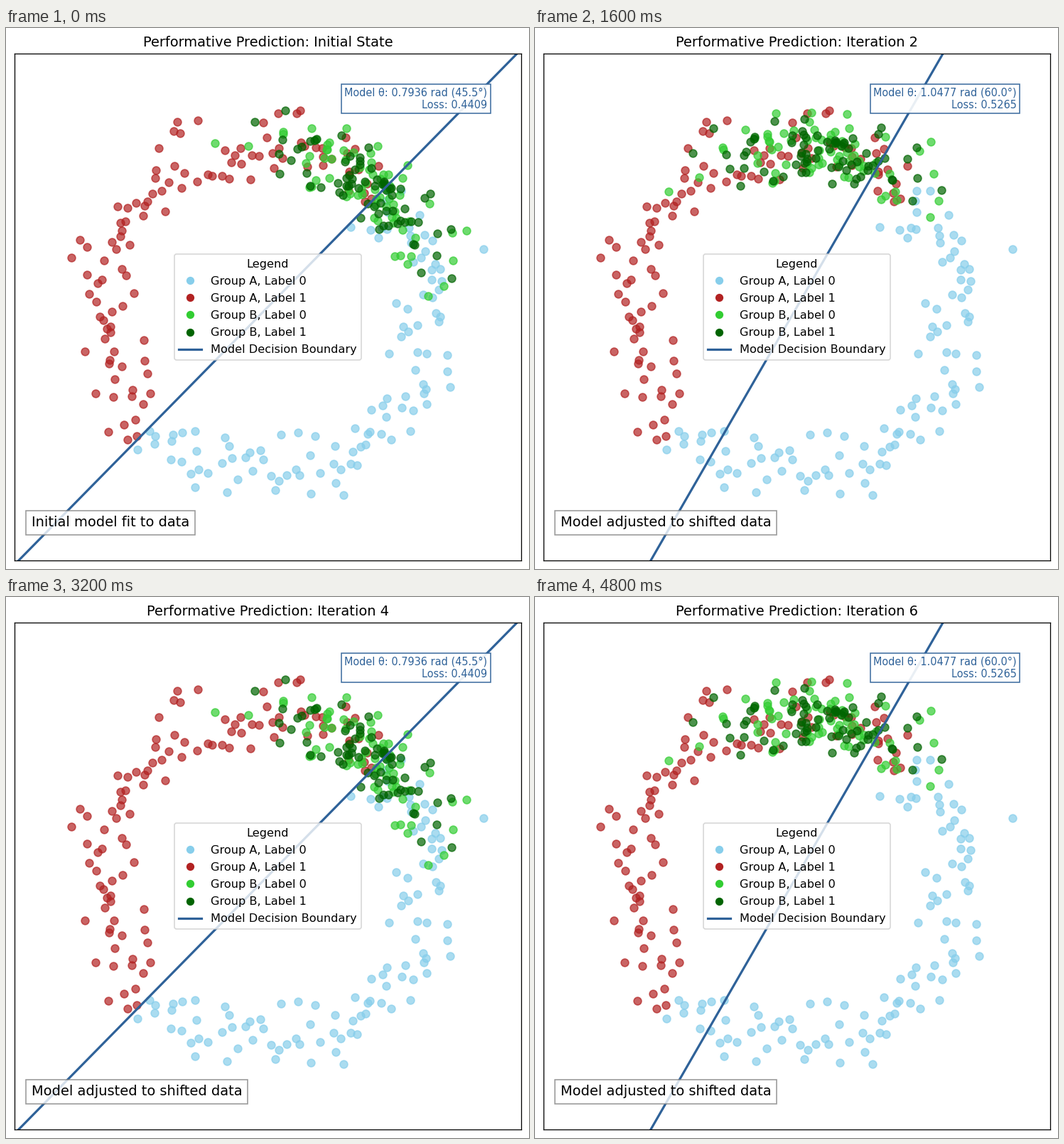
These frames come from a looping animation (736x761 px, 5.6 s). A matplotlib script:

```python
import numpy as np
import matplotlib.pyplot as plt
from matplotlib.animation import FuncAnimation
from matplotlib.lines import Line2D

plt.rcParams["font.family"] = "DejaVu Sans"

W, H, DPI = 736, 761, 116
LEFT, TOP, SIDE = 12, 36, 713
LIMIT = 1.5
BLUE = "#2f6299"

# One entry per step of the repeating cycle
THETAS = [0.7936, 0.3655, 1.0477, 0.7987]
LOSSES = [0.4409, 0.6881, 0.5265, 0.8521]
TURNS = [0, -60, 30, -90]

# Outliers as (degrees, radius)
FAR_A = [(15, 1.32), (44, 0.68), (292, 1.2), (87, 1.15), (116, 1.22),
         (166, 1.2), (218, 1.2)]
FAR_B = [(108, 1.02), (94, 1.1), (97, 0.96), (86, 0.91), (21, 1.26),
         (9, 1.1), (71, 0.75), (46, 0.85)]

rng = np.random.default_rng(42)


def ring(degrees, outliers):
    """Noisy ring at the given angles; returns angles and radii."""
    radius = np.clip(rng.normal(0.97, 0.1, degrees.size), 0.76, 1.18)
    far_angle, far_radius = np.transpose(outliers)
    return (np.concatenate([far_angle, degrees]),
            np.concatenate([far_radius, radius]))


def place(degrees, radius):
    angle = np.radians(degrees)
    return np.column_stack([radius * np.cos(angle), radius * np.sin(angle)])


# Group A fills the ring and is labelled by side; group B clusters near 50°.
spots = np.arange(210)
angle_a, radius_a = ring((45 + 360 * (spots + rng.random(210)) / 210) % 360,
                         FAR_A)
angle_b, radius_b = ring(np.clip(rng.normal(50, 18, 132), 4, 85), FAR_B)
side_a = (angle_a >= 45) & (angle_a < 225)
side_b = np.arange(angle_b.size) % 2 == 1

GROUPS = [
    ("Group A, Label 0", "skyblue", angle_a[~side_a], radius_a[~side_a]),
    ("Group A, Label 1", "firebrick", angle_a[side_a], radius_a[side_a]),
    ("Group B, Label 0", "limegreen", angle_b[~side_b], radius_b[~side_b]),
    ("Group B, Label 1", "darkgreen", angle_b[side_b], radius_b[side_b]),
]

fig = plt.figure(figsize=(6.345, 6.5605), dpi=DPI, facecolor="white")
ax = fig.add_axes([LEFT / W, 1 - (TOP + SIDE) / H, SIDE / W, SIDE / H])
ax.set(xlim=(-LIMIT, LIMIT), ylim=(-LIMIT, LIMIT), xticks=[], yticks=[])

dots = [ax.scatter(*place(angle, radius).T, s=45, color=color, alpha=0.7)
        for _, color, angle, radius in GROUPS]
boundary, = ax.plot([], [], color=BLUE, lw=2)
title = ax.set_title("", fontsize=12)
info = ax.text(1.3, 1.3, "", fontsize=9, color=BLUE, ha="right", va="top",
               bbox=dict(boxstyle="square,pad=0.3", facecolor="white",
                         edgecolor=BLUE, alpha=0.9))
note = ax.text(-1.4, -1.3, "", fontsize=12,
               bbox=dict(boxstyle="square,pad=0.4", facecolor="white",
                         edgecolor="gray", alpha=0.8))

handles = [Line2D([0], [0], marker="o", color="w", markerfacecolor=color,
                  markersize=8, label=label) for label, color, *_ in GROUPS]
handles.append(Line2D([0], [0], color=BLUE, lw=2,
                      label="Model Decision Boundary"))
ax.legend(handles=handles, title="Legend", loc="center", fontsize=10,
          title_fontsize=10, framealpha=0.8, labelspacing=0.57)


def update(i):
    phase = i % len(THETAS)
    theta = THETAS[phase]
    for dot, (_, _, angle, radius) in zip(dots[2:], GROUPS[2:]):
        dot.set_offsets(place(angle + TURNS[phase], radius))

    reach = np.array([-3, 3])
    boundary.set_data(reach * np.cos(theta), reach * np.sin(theta))

    stage = f"Iteration {i}" if i else "Initial State"
    title.set_text(f"Performative Prediction: {stage}")
    info.set_text(f"Model θ: {theta:.4f} rad ({np.degrees(theta):.1f}°)\n"
                  f"Loss: {LOSSES[phase]:.4f}")
    if i == 0:
        note.set_text("Initial model fit to data")
    elif i % 2:
        note.set_text("Group B (green) shifted in response to model")
    else:
        note.set_text("Model adjusted to shifted data")
    return [*dots, boundary, title, info, note]


anim = FuncAnimation(fig, update, frames=7, interval=800, repeat=True,
                     repeat_delay=0, blit=False)
plt.show()
```
